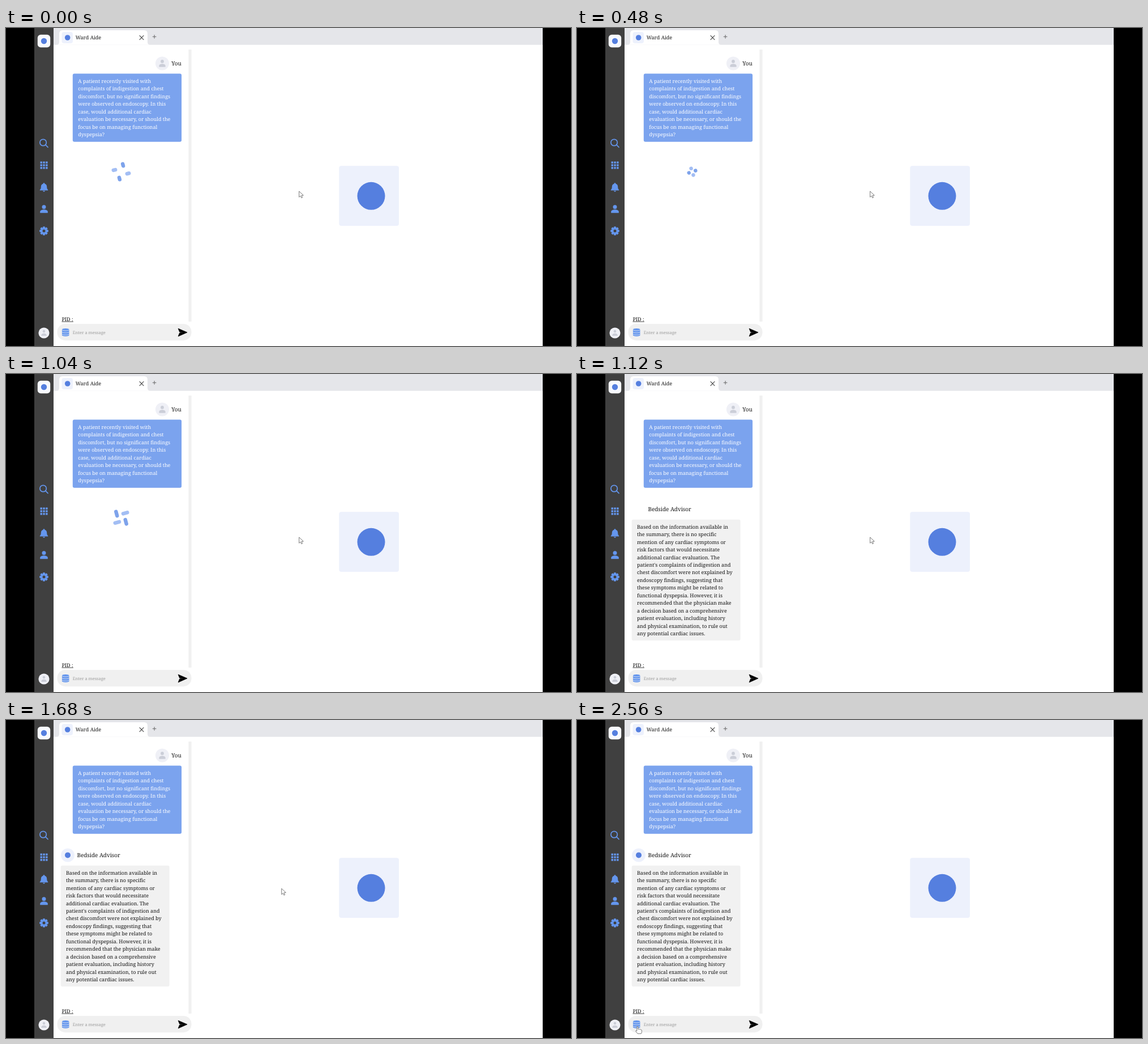
An HTML page that plays this animation: 998x561 px, repeating every 3280 ms.

```html
<!DOCTYPE html>
<html lang="en">
<head>
<meta charset="utf-8">
<title>Chat panel</title>
<style>
  html, body { margin: 0; width: 100%; height: 100%; overflow: hidden; background: #000; }
  svg { display: block; width: 100%; height: 100%; }
  text {
    font-family: "Noto Serif", serif; font-size: 8.97px; fill: #141414;
    white-space: pre; text-rendering: geometricPrecision;
  }
  .name { font-size: 9.95px; }
  .ask text { fill: #fff; }
  .hint { font-size: 7.5px; fill: #9b9b9b; }
  .icon { fill: #6496ee; }
  .tile { fill: #edf1fc; }
  .dot { fill: #557fdf; }
  .bar { fill: #f0f0f0; }
  .pointer path { fill: #fff; stroke: #6c6c6c; stroke-width: .9; stroke-linejoin: round; }
</style>
</head>
<body>
<svg viewBox="0 0 998 561">
  <defs>
    <g id="person">
      <circle r="12" fill="#eff0f6"/>
      <circle cy="-3.6" r="2.9" fill="#cbced8"/>
      <path d="M-5.6 6.2V4.2C-5.6 1.8-2.2.8 0 .8S5.6 1.8 5.6 4.2V6.2Z" fill="#cbced8"/>
    </g>
  </defs>

  <rect width="998" height="561"/>
  <rect x="84" width="864" height="561" fill="#fff"/>
  <rect x="50" width="34" height="561" fill="#404040"/>
  <rect x="84" width="864" height="29.7" fill="#e5e6ea"/>

  <!-- tab -->
  <path d="M89 29.7Q94 29.7 94 24.7V10Q94 4 100 4H244Q250 4 250 10V24.7Q250 29.7 255 29.7Z" fill="#fff"/>
  <rect class="tile" x="98.5" y="7" width="19.5" height="20" rx="4"/>
  <circle class="dot" cx="108.7" cy="17" r="4.8"/>
  <text x="122.8" y="20.3">Ward Aide</text>
  <path d="M235.7 13.2L243.3 20.8M243.3 13.2L235.7 20.8" stroke="#4a4a4a" stroke-width="1.2"/>
  <path d="M258.8 15.3H265.4M262.1 12V18.6" stroke="#666" stroke-width="1"/>

  <!-- sidebar -->
  <rect x="55.8" y="11.8" width="22.4" height="22.4" rx="5.5" fill="#f7f9fe"/>
  <circle class="dot" cx="67" cy="23" r="5.2"/>
  <g fill="none" stroke="#6496ee" stroke-width="1.7" stroke-linecap="round">
    <circle cx="65.6" cy="202" r="5.7"/>
    <path d="M69.8 206.2L74 210.4"/>
  </g>
  <g id="grid" class="icon"></g>
  <path class="icon" d="M67 273.2C67.9 273.2 68.4 273.9 68.4 274.7C71 275.4 72.2 277.5 72.2 280.2C72.2 283 72.9 284 74.2 285.4V286.4H59.8V285.4C61.1 284 61.8 283 61.8 280.2C61.8 277.5 63 275.4 65.6 274.7C65.6 273.9 66.1 273.2 67 273.2ZM65 287.2H69Q68.6 288.9 67 288.9T65 287.2Z"/>
  <g class="icon">
    <circle cx="67" cy="315.7" r="3.5"/>
    <path d="M60.2 326.2V324.2C60.2 321.4 64.2 320.3 67 320.3S73.8 321.4 73.8 324.2V326.2Z"/>
  </g>
  <g id="gear" class="icon" transform="translate(67 358)"></g>
  <use href="#person" transform="translate(67 538) scale(.8)"/>

  <!-- chat -->
  <rect class="bar" x="322.5" y="38" width="5" height="480"/>
  <use href="#person" x="276" y="62.5"/>
  <text class="name" x="292.2" y="66">You</text>
  <rect x="117.8" y="80.4" width="192.3" height="120.4" rx="3" fill="#7ba3ee"/>
  <g id="ask" class="ask"></g>
  <g id="loader" transform="translate(203.5 253.6) rotate(-15)"></g>
  <g id="reply">
    <g id="badge">
      <circle class="tile" cx="109" cy="238.4" r="12"/>
      <circle class="dot" cx="109" cy="238.4" r="5"/>
    </g>
    <text class="name" x="125.4" y="241.9">Bedside Advisor</text>
    <rect x="96.7" y="256.7" width="192" height="213.5" rx="3" fill="#f1f1f1"/>
  </g>
  <text x="98.4" y="516.7">PID :</text>
  <path d="M98.4 518.1H118.9" stroke="#141414" stroke-width=".8"/>

  <!-- message box -->
  <rect class="bar" x="90.5" y="522" width="237" height="29.2" rx="14"/>
  <path class="icon" d="M98.9 532C98.9 529.2 111.5 529.2 111.5 532V541.8C111.5 544.6 98.9 544.6 98.9 541.8Z"/>
  <g id="seams" fill="none" stroke="#f0f0f0" stroke-width=".8"></g>
  <text class="hint" x="117.8" y="539.5">Enter a message</text>
  <path d="M304.2 530.2L320 537L304.2 544L306.6 537.9L313 537L306.6 536.2Z" stroke="#000" stroke-width=".8" stroke-linejoin="round"/>

  <!-- start panel -->
  <rect class="tile" x="588.3" y="243.2" width="105.7" height="105.8" rx="4"/>
  <circle class="dot" cx="645" cy="296.3" r="24.5"/>

  <g class="pointer">
    <path id="arrow" d="M0 0V10.4L2.5 8.2L4.2 11.8L5.9 11L4.3 7.5L7.6 7.2Z"/>
    <path id="hand" d="M-1 .8Q0-.5 1 .8V5L2.8 5.2Q4 4.8 4.6 5.6Q6 5.2 6.4 6.3Q7.6 6.2 7.6 7.6V9.4Q7.6 11 6.6 13H.2L-3 8.9Q-3.4 7.6-2.2 7.5L-1 8.4Z"/>
  </g>
</svg>
<script>
const LOOP = 3280, STEP = 80;
const REPLY_AT = 1120, BADGE_AT = 1200;
const MOVE_FROM = 1600, MOVE_TO = 2080;
const LINE = 13.46;

const $ = id => document.getElementById(id);
const mix = (a, b, k) => a + (b - a) * k;
const clamp = k => Math.max(0, Math.min(1, k));
const smooth = k => k * k * (3 - 2 * k);

function add(parent, tag, attrs, text = "") {
  const el = document.createElementNS("http://www.w3.org/2000/svg", tag);
  for (const key in attrs) el.setAttribute(key, attrs[key]);
  el.textContent = text;
  parent.appendChild(el);
  return el;
}

function paragraph(parent, x, y, lines) {
  lines.forEach((line, i) => add(parent, "text", { x, y: y + i * LINE }, line));
}

paragraph($("ask"), 127.3, 97, [
  "A patient recently visited with",
  "complaints of indigestion and chest",
  "discomfort, but no significant findings",
  "were observed on endoscopy. In this",
  "case, would additional cardiac",
  "evaluation be necessary, or should the",
  "focus be on managing functional",
  "dyspepsia?"
]);

paragraph($("reply"), 106, 272.7, [
  "Based on the information available in",
  "the summary, there is no specific",
  "mention of any cardiac symptoms or",
  "risk factors that would necessitate",
  "additional cardiac evaluation. The",
  "patient's complaints of indigestion and",
  "chest discomfort were not explained by",
  "endoscopy findings, suggesting that",
  "these symptoms might be related to",
  "functional dyspepsia. However, it is",
  "recommended that the physician make",
  "a decision based on a comprehensive",
  "patient evaluation, including history",
  "and physical examination, to rule out",
  "any potential cardiac issues."
]);

for (let i = 0; i < 9; i++) {
  add($("grid"), "rect", {
    x: 60.5 + (i % 3) * 4.8, y: 235.5 + Math.floor(i / 3) * 4.8, width: 3.5, height: 3.5
  });
}

add($("gear"), "circle", { r: 6 });
for (let a = 0; a < 360; a += 45) {
  add($("gear"), "rect", { x: -2, y: -7.8, width: 4, height: 4, rx: 1, transform: `rotate(${a})` });
}
add($("gear"), "circle", { r: 2.5, fill: "#404040" });

for (const y of [532.2, 535.9, 539.6]) {
  add($("seams"), "path", { d: `M98.9 ${y}c0 2.6 12.6 2.6 12.6 0` });
}

// Four pills, each sliding along its own bar of a tilted lattice.
const WIDTH = 6.5;
const pills = [0, 1, 2, 3].map(i => add($("loader"), "rect", {
  x: 6.1 - WIDTH / 2, width: WIDTH, rx: WIDTH / 2,
  fill: i % 2 ? "#a3bef4" : "#7ea3eb", transform: `rotate(${i * 90})`
}));

function drawLoader(t) {
  const early = t < 480;
  const k = early ? t / 480 : (t - 480) / 560;
  const top = early ? mix(-15.8, -3.6, k) : mix(-3.6, 2, k);
  const end = early ? mix(-5.8, 2.9, k) : mix(2.9, 16, k);
  for (const pill of pills) {
    pill.setAttribute("y", top);
    pill.setAttribute("height", end - top);
  }
}

function pointerAt(t) {
  if (t >= 2560) return [106.8, 540.3];
  if (t >= 2480) return [105.4, 538.6];
  if (t >= 2400) return [102.2, 540.5];
  const k = smooth(clamp((t - MOVE_FROM) / (MOVE_TO - MOVE_FROM)));
  return [mix(517.7, 99.8, k), mix(288, 544.2, k * mix(.45, 1, k))];
}

const show = (el, on) => el.setAttribute("visibility", on ? "inherit" : "hidden");

function draw(now) {
  const t = Math.floor((now % LOOP) / STEP) * STEP;
  const replied = t >= REPLY_AT;
  show($("loader"), !replied);
  show($("reply"), replied);
  show($("badge"), t >= BADGE_AT);
  if (!replied) drawLoader(t);

  const pointing = t >= 2480;
  const place = `translate(${pointerAt(t).join(" ")})`;
  for (const id of ["arrow", "hand"]) $(id).setAttribute("transform", place);
  show($("arrow"), !pointing);
  show($("hand"), pointing);
}

const start = performance.now();
function frame() {
  draw(performance.now() - start);
  requestAnimationFrame(frame);
}
frame();
</script>
</body>
</html>
```
